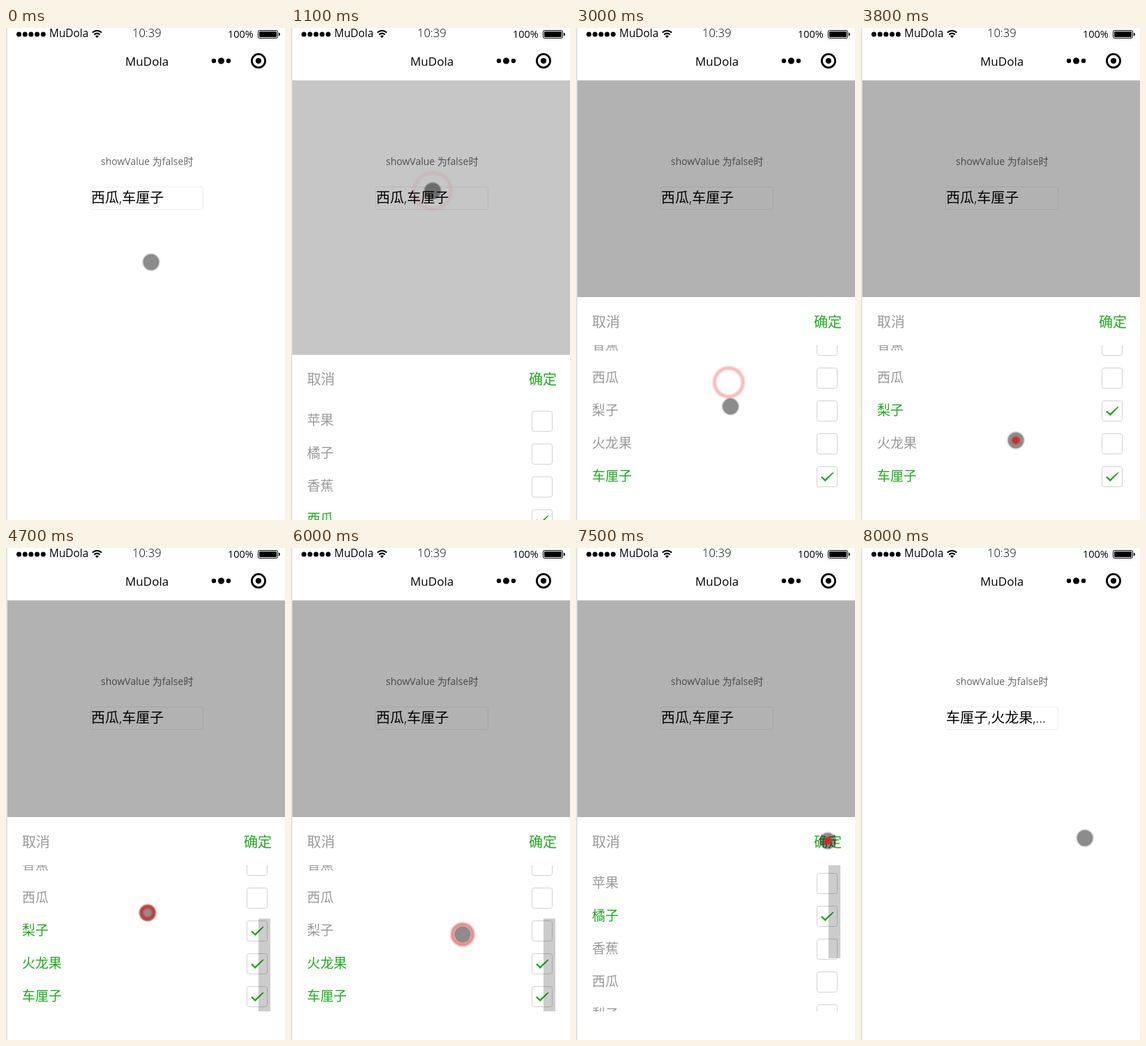
Recreate the animation shown at these times as an HTML page. Size 400 px wide and 704 px high, loop 8100 ms.

```html
<!DOCTYPE html>
<html lang="zh-CN">
<head>
<meta charset="utf-8">
<title>Picker</title>
<style>
  html, body { margin: 0; width: 100%; height: 100%; overflow: hidden; background: #fff; }
  svg { display: block; font-family: "Open Sans", "Noto Sans CJK SC", "Noto Sans CJK", sans-serif; }
  .thin { font-weight: 350; }
  .row { font-size: 19px; fill: #999; }
  .row rect { fill: #fff; stroke: #d1d1d1; }
  .row path { fill: none; }
  .row.on, .row.on path { fill: #1aad19; }
  #ring { fill: none; stroke: #e02020; stroke-width: 5; filter: blur(.8px); }
</style>
</head>
<body>
<svg width="400" height="704" viewBox="0 0 400 704">
  <defs><clipPath id="view"><rect x="2" y="454" width="398" height="209"/></clipPath></defs>
  <rect width="400" height="704" fill="#fff"/>

  <!-- page -->
  <text x="136" y="196" font-size="14" fill="#666">showValue 为false时</text>
  <rect x="121.5" y="227.5" width="161" height="32" rx="2.5" fill="none" stroke="#eee"/>
  <text id="value" class="thin" x="122" y="249.5" font-size="20"></text>
  <rect id="mask" x="2" y="75" width="398" height="629" fill-opacity="0"/>

  <!-- picker -->
  <g id="panel">
    <rect x="2" y="385" width="398" height="319" fill="#fff"/>
    <g class="thin" font-size="20">
      <text x="23" y="427.5" fill="#999">取消</text>
      <text x="341" y="427.5" fill="#1aad19">确定</text>
    </g>
    <g clip-path="url(#view)">
      <g id="list" class="thin"></g>
      <rect id="bar" x="362" width="17" height="133" fill-opacity=".2"/>
    </g>
  </g>

  <!-- status and title bars -->
  <g id="signal"></g>
  <text x="62" y="13" font-size="15.4">MuDola</text>
  <path d="M123.8 6.6Q130.5 .8 137.2 6.6M126.3 9.5Q130.5 5.7 134.7 9.5" fill="none" stroke="#000" stroke-width="2"/>
  <path d="M128 11.6Q130.5 9.6 133 11.6L130.5 14.2Z"/>
  <text class="thin" x="181" y="13" font-size="16.5">10:39</text>
  <text x="318" y="14" font-size="14.5">100%</text>
  <rect x="361.5" y="3.5" width="28" height="11" rx="2" fill="none" stroke="#000"/>
  <rect x="363" y="5" width="25" height="8" rx="1"/>
  <path d="M391 6.5Q393 7 393 9T391 11.5Z"/>
  <text x="171" y="54" font-size="17">MuDola</text>
  <circle cx="298" cy="47" r="3.2"/>
  <circle cx="308.5" cy="47" r="4.5"/>
  <circle cx="319" cy="47" r="3.2"/>
  <circle cx="362" cy="47" r="9.6" fill="none" stroke="#000" stroke-width="2.8"/>
  <circle cx="362" cy="47" r="4"/>
  <rect width="2" height="704" fill="#e2e2e2"/>

  <g id="cursor">
    <circle r="11.5" fill-opacity=".45"/>
    <circle r="12.5" fill="none" stroke="#000" stroke-opacity=".18"/>
  </g>
  <circle id="ring"/>
</svg>

<script>
const LOOP = 8100, STEP = 100;
const MOVE = 400, RIPPLE = 500, DELAY = 200;
const ROW = 47, VIEW_TOP = 454, VIEW_H = 209;

const fruits = ['苹果', '橘子', '香蕉', '西瓜', '梨子', '火龙果', '车厘子'];
const initial = ['西瓜', '车厘子'];
const LIST_H = ROW * fruits.length;

// where the pointer arrives, and whether it taps there
const TAP = true;
const stops = [
  [0, 208, 335], [700, 203, 233, TAP], [1700, 209, 548], [2700, 219, 507, TAP],
  [3100, 222, 548, TAP], [3800, 222, 590, TAP], [4600, 203, 522, TAP],
  [5300, 206, 540, TAP], [5800, 246, 553, TAP], [6600, 246, 547, TAP],
  [7500, 361, 419, TAP], [8000, 321, 415]
];
const taps = stops.filter(stop => stop[3]);

const $ = id => document.getElementById(id);
const ramp = (t, from, to) => Math.min(1, Math.max(0, (t - from) / (to - from)));
const smooth = p => p * p * (3 - 2 * p);
const mix = (a, b, p) => a + (b - a) * p;
const move = (el, x, y) => el.setAttribute('transform', `translate(${x} ${y})`);

const scrollAt = t =>
  Math.round((LIST_H - VIEW_H) * (ramp(t, 1690, 2500) - ramp(t, 6100, 6400)));
const openAt = t => smooth(ramp(t, 900, 1200)) - smooth(ramp(t, 7600, 7900));

function pointerAt(t) {
  const i = stops.filter(([time]) => t >= time - MOVE).length - 1;
  const [, x0, y0] = stops[Math.max(0, i - 1)];
  const [time, x, y] = stops[i];
  const p = smooth(ramp(t, time - MOVE, time));
  return [mix(x0, x, p), mix(y0, y, p)];
}

// every tap inside the list toggles the row below it
function pickedAt(t) {
  let picked = initial;
  for (const [time, , y] of taps) {
    const name = fruits[Math.floor((y + scrollAt(time) - VIEW_TOP) / ROW)];
    if (!name || y < VIEW_TOP || t < time + DELAY) continue;
    picked = picked.includes(name) ? picked.filter(n => n !== name) : [...picked, name];
  }
  return picked;
}

function label(names) {
  const text = names.join(',');
  return text.length > 8 ? text.slice(0, 8) + '...' : text;
}

for (let i = 0; i < 5; i++)
  $('signal').innerHTML += `<circle cx="${18.5 + i * 8.7}" cy="9" r="3.5"/>`;

$('list').innerHTML = fruits.map((name, i) =>
  `<g class="row" transform="translate(0 ${480 + i * ROW})">
    <text x="23" y="5.5">${name}</text>
    <rect x="345.5" y="-14.5" width="29" height="29" rx="3"/>
    <path d="M351 1L352.8 -.5L357 3.6L368.4 -6.4L369.5 -5.6L357.3 7Z"/>
  </g>`).join('');
const rows = [...$('list').children];

function draw(t) {
  const scroll = scrollAt(t), open = openAt(t), picked = pickedAt(t);
  $('value').textContent = label(t < 7700 ? initial : picked);
  $('mask').setAttribute('fill-opacity', open * 0.3);
  move($('panel'), 0, (1 - open) * 319);
  $('panel').setAttribute('visibility', open ? 'visible' : 'hidden');
  move($('list'), 0, -scroll);
  rows.forEach((row, i) => row.classList.toggle('on', picked.includes(fruits[i])));

  const barShown = (t >= 1800 && t < 2700) || t >= 4200;
  $('bar').setAttribute('y', VIEW_TOP + scroll * VIEW_H / LIST_H);
  $('bar').setAttribute('opacity', barShown ? 1 : 0);

  move($('cursor'), ...pointerAt(t));

  // the ripple stays where the tap happened
  const tap = taps.find(([time]) => t >= time && t < time + RIPPLE);
  const ring = $('ring');
  ring.setAttribute('opacity', 0);
  if (tap) {
    const p = (t - tap[0]) / RIPPLE;
    move(ring, tap[1], tap[2]);
    ring.setAttribute('r', 3 + 29 * p);
    ring.setAttribute('opacity', 1 - 1.15 * p);
  }
}

function tick() {
  draw(Math.floor(performance.now() % LOOP / STEP) * STEP);
  requestAnimationFrame(tick);
}
tick();
</script>
</body>
</html>
```
